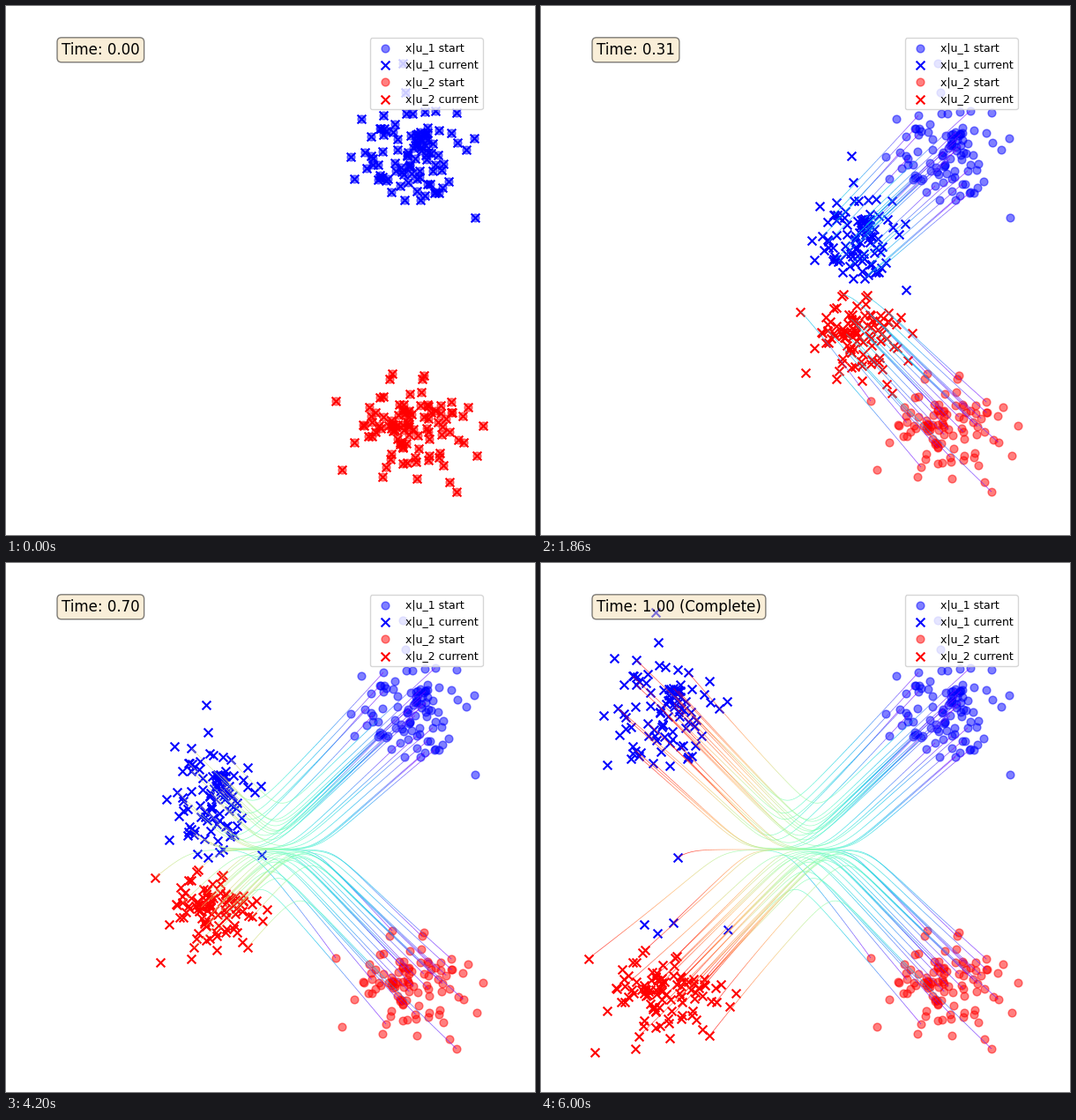
Write a matplotlib script that moves like this. It is 600 px wide and 600 px high and loops after 7.98 s.

```python
import numpy as np
import matplotlib.pyplot as plt
from matplotlib.animation import FuncAnimation
from matplotlib.collections import LineCollection

SIZE, DPI = 600, 100
STEPS, HOLD, INTERVAL = 100, 32, 60
TOTAL, TRAILS, LEADS = 100, 24, 4
MID = 325             # height where the two flows meet
X0, TRAVEL = 465, 320  # mean start and mean travel in x

# Outlying points; the first LEADS of each leave a trail
TOP = [(470, 220), (475, 214.6), (407, 166), (447, 204), (450, 65), (453, 98),
       (403, 128), (511, 121), (531, 150), (532, 240), (391, 171), (395, 196)]
BOTTOM = [(374, 448), (511, 551), (431, 523), (438, 417), (381, 526), (427, 534),
          (466, 536), (503, 540), (534, 510), (541, 476), (524, 455), (395, 495)]


def cluster(outer, center, radii, core, spread, rng):
    """Outliers, a loose disc and a dense core, with the leads first."""
    n = TOTAL - len(outer)
    angle = rng.uniform(0, 2 * np.pi, n)
    radius = np.sqrt(rng.uniform(0, 1, n))[:, None]
    disc = center + radius * radii * np.column_stack([np.cos(angle), np.sin(angle)])
    dense = rng.normal(core, spread, (n, 2))
    inner = np.where(rng.random((n, 1)) < 0.4, dense, disc)
    return np.vstack([outer[:LEADS], inner, outer[LEADS:]])


def top_end(q):
    """Final distance from the middle; the lowest points change side."""
    stay = q + 3 - 25 * np.exp((113 - q) / 20)
    cross = -100 * (1 - np.exp(np.minimum(q - 113.4, 0) / 4))
    return np.where(q > 113.4, stay, cross)


def bottom_end(q):
    return q + 26 * np.exp((92 - q) / 60)


def flow(start, side, speed, end):
    """Positions of every point at every step, shape (steps + 1, n, 2)."""
    t = np.linspace(0, 1, STEPS + 1)[:, None]
    dx = start[:, 0] - X0
    x = X0 - TRAVEL * t - 3 * np.sin(np.pi * t) + dx * np.hypot(1 - t, t)

    first = side * (start[:, 1] - MID)
    tilt = np.clip(0.33 - 0.007 * (first - 110), -0.4, 0.28)
    last = end(first + tilt * dx)
    size = np.abs(last)
    soft = 0.08 * first
    inward = (first - (speed + 0.3 * (first - 160)) * t) / soft
    outward = (size - (318 + 0.3 * (size - 160)) * (1 - t)) / soft

    bounce = np.logaddexp(np.logaddexp(inward, outward), 0)
    cross = np.logaddexp(0, inward) - np.logaddexp(0, outward)
    dist = soft * np.where(last >= 0, bounce, cross)
    return np.stack([x, MID + side * dist], axis=-1)


rng = np.random.default_rng(8)
top = cluster(TOP, (464, 167), (60, 54), (472, 160), (8, 14), rng)
bottom = cluster(BOTTOM, (463, 474), (60, 58), (463, 473), (14, 14), rng)
paths = [flow(top, -1, 308, top_end), flow(bottom, 1, 342, bottom_end)]

trails = np.concatenate([p[:, :TRAILS] for p in paths], axis=1)
segments = np.stack([trails[:-1], trails[1:]], axis=2)
count = segments.shape[1]
shades = np.repeat(plt.cm.rainbow(np.linspace(0, 1, STEPS)), count, axis=0)

fig = plt.figure(figsize=(SIZE / DPI, SIZE / DPI), dpi=DPI, facecolor="white")
ax = fig.add_axes([0, 0, 1, 1])
ax.set_xlim(0, SIZE)
ax.set_ylim(SIZE, 0)
ax.axis("off")

marks = []
for name, color, path in zip(("u_1", "u_2"), ("blue", "red"), paths):
    ax.scatter(*path[0].T, s=40, c=color, alpha=0.5, label=f"x|{name} start")
    marks.append(ax.scatter(*path[0].T, s=50, c=color, marker="x",
                            label=f"x|{name} current"))

lines = LineCollection([], linewidths=0.5, alpha=0.8, zorder=2)
ax.add_collection(lines, autolim=False)
ax.legend(loc="upper right", fontsize=9, borderaxespad=0,
          bbox_to_anchor=(540.5, 36.25), bbox_transform=ax.transData)
clock = ax.text(63, 40.8, "", fontsize=12, va="top",
                bbox=dict(boxstyle="round,pad=0.3", facecolor="wheat", alpha=0.5))


def draw(frame):
    step = min(frame, STEPS)
    for mark, path in zip(marks, paths):
        mark.set_offsets(path[step])
    lines.set_segments(segments[:step].reshape(-1, 2, 2))
    lines.set_color(shades[:step * count])
    done = " (Complete)" if step == STEPS else ""
    clock.set_text(f"Time: {step / STEPS:.2f}{done}")
    return [*marks, lines, clock]


anim = FuncAnimation(fig, draw, frames=STEPS + HOLD + 1, init_func=lambda: draw(0),
                     interval=INTERVAL, repeat=True, repeat_delay=0, blit=False)
plt.show()
```
